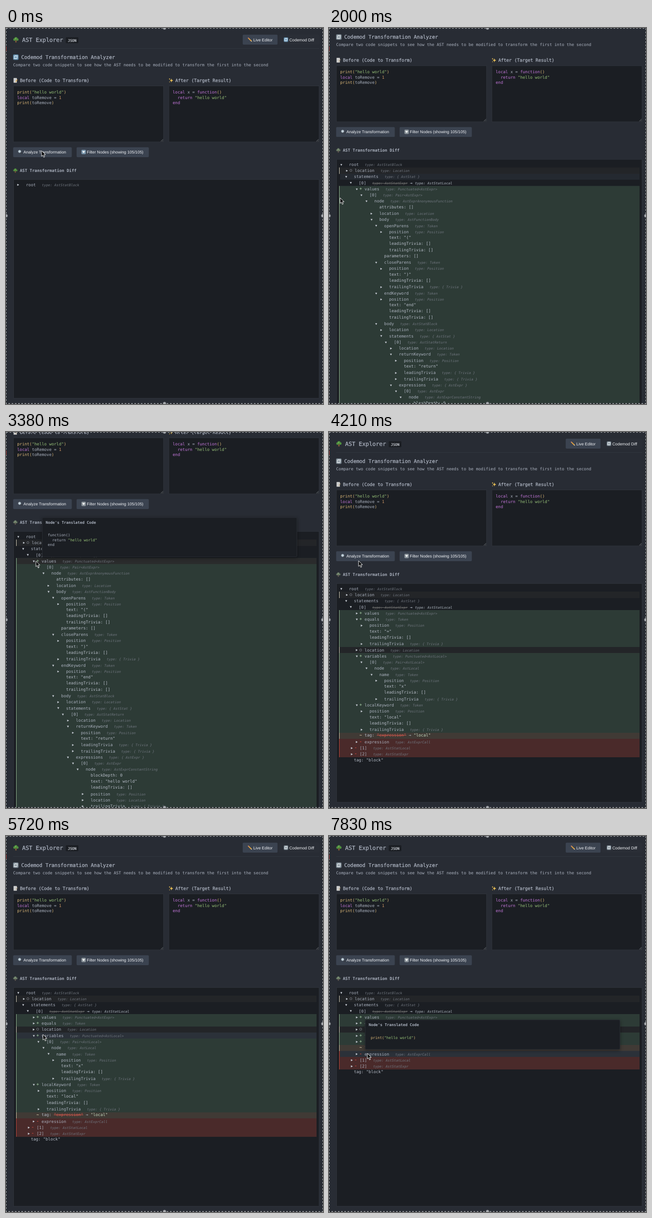
Animation of 687x815 px, one loop 8000 ms. Source, as an HTML page:

```html
<!DOCTYPE html>
<html lang="en">
<head>
<meta charset="utf-8">
<title>AST Explorer</title>
<style>
  html, body { margin: 0; width: 100%; height: 100%; overflow: hidden; background: #282c34; }
  body { position: relative; --row: 13.286px; text-rendering: geometricPrecision; }
  svg { position: absolute; left: 0; top: 0; overflow: visible; }
  svg text, #panel { font: 8.83px "DejaVu Sans Mono", monospace; fill: #abb2bf; color: #abb2bf; white-space: pre; }
  #page, #cursor, #arrow, #hand, #bar, .tip, .fold, .dull { animation: 8s step-end infinite; }

  svg .h1 { font-size: 12.25px; }
  svg .h2 { font-size: 10.9px; }
  svg .h3 { font-size: 9.6px; }
  svg .h4 { font-size: 8.9px; }
  svg .h1, svg .h2, svg .h3 { stroke: #abb2bf; stroke-width: .3px; }
  svg .h4 { font-weight: bold; }
  svg .badge { font-size: 7.75px; fill: #d5d9e0; stroke: #d5d9e0; stroke-width: .2px; }
  svg .btn { font: 8.82px "Liberation Sans", Arial, sans-serif; fill: #f2f4f7; }
  .dull { animation-name: dull; }
  .call { fill: #dcb878; color: #dcb878; }
  .str { fill: #98c379; color: #98c379; }
  .key { fill: #c678dd; }
  .num { fill: #d19a66; }
  .box { fill: #1b1e23; stroke: #30353d; }
  .face { fill: #3b4350; }

  #panel { position: absolute; left: 15.5px; top: 327.5px; width: 663.5px; min-height: 475px;
    box-sizing: border-box; padding: 4.5px 5px 5px 5.5px; border: 1px solid #2e333b; background: #1b1e23; isolation: isolate; }
  .row { position: relative; box-sizing: border-box; height: var(--row); line-height: var(--row);
    padding: .7px 0 0 calc(21.3px + 10.63px * var(--d) + var(--shift, 0px)); }
  .mark { position: absolute; margin-left: -11.2px; color: var(--edge); }
  .tri { position: absolute; margin-left: -19.4px; top: 4.6px; width: 4.6px; height: 4.6px; background: #c3c8d0;
    clip-path: polygon(10% 0, 100% 50%, 10% 100%); }
  .open { transform: rotate(90deg); }
  .leaf { color: #b6bcc7; }
  .type { font-size: 7.475px; font-style: italic; color: #70767f; }
  .row .type:first-of-type { margin-left: 13.3px; }
  .type.new { font-weight: bold; color: #828991; }
  .was { color: #d0574c; text-decoration: line-through; }
  .type.was { color: #70706f; }
  .now { color: #c5dcc0; }
  .add, .del, .loc, .mod { --shift: 1.9px; position: relative; }
  :is(.add, .del, .loc, .mod)::before { content: ""; position: absolute; z-index: -2; inset: 0;
    background: var(--bg); border-left: 1.8px solid var(--edge); }
  .add { --bg: #2d3b36; --edge: #94b894; }
  .del { --bg: #4a2a2a; --edge: #c2483d; }
  .loc { --bg: #232528; --edge: #d9d2bd; }
  .mod { --bg: #403a35; --edge: #dccbaa; }
  .loc .mark { color: #8b9098; }
  .fold > .row > .tri { transform: rotate(var(--turn)); }
  .fold > .kids { max-height: var(--max); overflow: hidden; }

  #bar { position: absolute; z-index: -1; left: 7.3px; right: 5px; top: 4.5px; height: var(--row); background: #2b3139; animation-name: hover; }
  .tip { position: absolute; z-index: 2; left: 61px; width: 551px; border: 1px solid #292d33; border-radius: 3px;
    background: #1b1e23; box-shadow: 0 2px 7px #0006; font-size: 8.1px; line-height: 10.6px; }
  .tip b { display: block; margin: 5px 0 17px 7.5px; font-size: 8.23px; }
  .tip div { margin: 0 0 20px 12px; }
  #tip1 { top: -31px; animation-name: tip1; }
  #tip2 { top: 69.5px; animation-name: tip2; }

  #page { position: absolute; inset: 0; animation-name: scroll; animation-timing-function: linear; }
  #cursor { position: absolute; left: 0; top: 0; animation-name: move; animation-timing-function: ease-in-out; }
  #arrow { animation-name: arrow; }
  #hand { animation-name: hand; }

  @keyframes scroll {
    0%, 22.5% { transform: none; }
    25% { transform: translateY(-43.4px); animation-timing-function: ease-out; }
    29.4%, 49.99% { transform: translateY(-112.9px); }
    50%, 100% { transform: none; }
  }
  @keyframes move {
    0%, 2.5% { transform: translate(77px, 266px); }
    8%, 21% { transform: translate(80px, 268px); }
    25% { transform: translate(24px, 368px); }
    31.5% { transform: translate(58px, 242px); }
    34.9%, 37.9% { transform: translate(88px, 278px); }
    44%, 47.9% { transform: translate(60px, 280px); }
    50%, 52.6% { transform: translate(64px, 279px); }
    59.9%, 64.25% { transform: translate(60px, 405px); }
    71.5%, 77.6% { transform: translate(80px, 430px); }
    80.2%, 81.5% { transform: translate(60px, 432px); }
    87.5%, 89.4% { transform: translate(60px, 445px); }
    97.4%, 100% { transform: translate(83px, 471px); }
  }
  @keyframes arrow { 0% { opacity: 1; } 3.5% { opacity: 0; } 22% { opacity: 1; } 100% { opacity: 1; } }
  @keyframes hand { 0% { opacity: 0; } 3.5% { opacity: 1; } 22% { opacity: 0; } 100% { opacity: 0; } }
  @keyframes dull { 0% { filter: none; } 22.5%, 100% { filter: saturate(.3); } }
  @keyframes hover {
    0% { opacity: 0; transform: none; }
    14.625% { opacity: 1; transform: translateY(var(--row)); }
    24% { opacity: .6; transform: translateY(calc(2 * var(--row))); }
    26% { opacity: 0; transform: none; }
    30.5% { opacity: 1; transform: translateY(var(--row)); background: #2a2b2c; }
    32.6% { opacity: 1; transform: translateY(calc(2 * var(--row))); }
    33.8% { opacity: 1; transform: translateY(calc(4 * var(--row))); }
    50% { opacity: 0; transform: none; }
    58.5% { opacity: 1; transform: translateY(calc(5 * var(--row))); }
    67% { opacity: 1; transform: translateY(calc(6 * var(--row))); }
    69.3% { opacity: 1; transform: translateY(calc(7 * var(--row))); background: #2b3139; }
    84.8% { opacity: 1; transform: translateY(calc(8 * var(--row))); }
    93% { opacity: 1; transform: translateY(calc(9 * var(--row))); }
    95.2%, 100% { opacity: 1; transform: translateY(calc(10 * var(--row))); }
  }
  @keyframes tip1 { 0% { opacity: 0; } 39% { opacity: 1; } 50% { opacity: 0; } 100% { opacity: 0; } }
  @keyframes tip2 { 0% { opacity: 0; } 96.8% { opacity: 1; } 100% { opacity: 1; } }
  @keyframes fold0 { 0% { --max: 0; --turn: 0deg; } 14.625%, 100% { --max: 9999px; --turn: 90deg; } }
  @keyframes fold1 { 0% { --max: 9999px; --turn: 90deg; } 50%, 100% { --max: 0; --turn: 0deg; } }
  @keyframes fold2 { 0% { --max: 9999px; --turn: 90deg; } 64.25%, 100% { --max: 0; --turn: 0deg; } }
  @keyframes fold3 { 0% { --max: 9999px; --turn: 90deg; } 81%, 100% { --max: 0; --turn: 0deg; } }
  @keyframes fold4 { 0% { --max: 9999px; --turn: 90deg; } 89.375%, 100% { --max: 0; --turn: 0deg; } }
</style>
</head>
<body>
<div id="page">
  <svg width="687" height="815">
    <defs>
      <symbol id="tree" viewBox="0 0 10 10"><path d="M4.2 5h1.6l.4 5H3.8z" fill="#8a6138"/><g fill="#4f8f3f"><circle cx="5" cy="2.6" r="2.5"/><circle cx="2.5" cy="4.6" r="2.3"/><circle cx="7.5" cy="4.6" r="2.3"/></g><circle cx="4.4" cy="3" r="1.3" fill="#72ae55"/></symbol>
      <symbol id="sync" viewBox="0 0 10 10"><rect width="10" height="10" rx="1.8" fill="#6b9abb"/><path d="M2.2 5a2.8 2.8 0 0 1 4.7-2M7.8 5a2.8 2.8 0 0 1-4.7 2" fill="none" stroke="#fff" stroke-width="1.1"/><path d="M6 4h2.4V1.6zM4 6H1.6v2.4z" fill="#fff"/></symbol>
      <symbol id="memo" viewBox="0 0 10 10"><path d="M1 0h7v10H1z" fill="#e4e5e3"/><path d="M2.2 2h4.6M2.2 4h4M2.2 6h3M2.2 8h2" stroke="#8b929b" stroke-width=".7"/><path d="M9.2 3.2L5 8.4" stroke="#dda13c" stroke-width="1.5"/></symbol>
      <symbol id="spark" viewBox="0 0 10 10"><path d="M6 1l1.1 3L10 5.2 7.1 6.4 6 9.5 4.9 6.4 2 5.2 4.9 4zM2 0l.6 1.5L4 2l-1.4.6L2 4l-.6-1.4L0 2l1.4-.5zM2 7l.4 1 1 .4-1 .4-.4 1-.4-1-1-.4 1-.4z" fill="#e6bd55"/></symbol>
      <symbol id="lens" viewBox="0 0 10 10"><path d="M5.6 5.6L9.3 9.3" stroke="#34383e" stroke-width="1.7"/><circle cx="3.7" cy="3.7" r="3" fill="#c4d3dc" stroke="#8f9aa3"/></symbol>
      <symbol id="down" viewBox="0 0 10 10"><rect width="10" height="10" rx="1.8" fill="#7b98ae"/><path d="M1.8 2.8h6.4L5 8z" fill="#fff"/></symbol>
      <symbol id="pencil" viewBox="0 0 10 10"><path d="M1.8 1.8l6 6" stroke="#e2a13c" stroke-width="2.3"/><path d="M.5.5l1.2 1.2" stroke="#d7837f" stroke-width="2.3"/><path d="M9.8 9.8L6.8 8.7l1.9-1.9z" fill="#ead7b0"/></symbol>
      <g id="grip"><path d="M-6.5-1.5l5-5M-3.5-1.5l2-2" stroke="#8d9299" stroke-width=".8"/></g>
    </defs>
    <use href="#tree" x="15.5" y="19.5" width="12" height="12"/>
    <text class="h1" x="35" y="29.5">AST Explorer</text>
    <rect x="129.5" y="20" width="27.5" height="13" rx="2" fill="#1b1e23"/>
    <text class="badge" x="134" y="29.5">JSON</text>
    <rect class="face" x="513" y="14.5" width="75.5" height="21.5" rx="2"/>
    <use href="#pencil" x="524" y="20.5" width="9.5" height="9.5"/>
    <text class="btn" x="536" y="28.5">Live Editor</text>
    <rect x="591" y="14.5" width="88" height="21.5" rx="2" fill="#2a2e36"/>
    <use class="dull" href="#sync" x="602" y="20.5" width="9.5" height="9.5"/>
    <text class="btn" x="614" y="28.5">Codemod Diff</text>
    <path d="M15.5 44.5H679" stroke="#31363f"/>

    <use class="dull" href="#sync" x="15.5" y="57.5" width="11.5" height="11.5"/>
    <text class="h2" x="33" y="67">Codemod Transformation Analyzer</text>
    <text x="15.5" y="82.5">Compare two code snippets to see how the AST needs to be modified to transform the first into the second</text>
    <use class="dull" href="#memo" x="15.5" y="108.5" width="10" height="10"/>
    <text class="h3" x="30.3" y="117">Before (Code to Transform)</text>
    <use href="#spark" x="352.5" y="108.5" width="10" height="10"/>
    <text class="h3" x="367" y="117">After (Target Result)</text>

    <rect class="box" x="16" y="125.5" width="325.5" height="121.5"/>
    <rect class="box" x="353" y="125.5" width="325.5" height="121.5"/>
    <use href="#grip" x="342" y="247.5"/>
    <use href="#grip" x="679" y="247.5"/>
    <text x="24.3" y="142"><tspan class="call">print(</tspan><tspan class="str">"hello world"</tspan><tspan class="call">)</tspan></text>
    <text x="24.3" y="153.5"><tspan class="key">local</tspan> toRemove = <tspan class="num">1</tspan></text>
    <text x="24.3" y="165"><tspan class="call">print(</tspan>toRemove<tspan class="call">)</tspan></text>
    <text x="361.3" y="142"><tspan class="key">local</tspan> x = <tspan class="key">function</tspan><tspan class="call">()</tspan></text>
    <text x="361.3" y="153.5">  <tspan class="key">return</tspan> <tspan class="str">"hello world"</tspan></text>
    <text x="361.3" y="165"><tspan class="key">end</tspan></text>

    <rect class="face" x="15.5" y="258.5" width="127" height="21.5" rx="2"/>
    <use href="#lens" x="26" y="264" width="9.5" height="9.5"/>
    <text class="btn" x="37.7" y="272">Analyze Transformation</text>
    <rect class="face" x="153" y="258.5" width="156.5" height="21.5" rx="2"/>
    <use class="dull" href="#down" x="163.5" y="264" width="9.5" height="9.5"/>
    <text class="btn" x="175.3" y="272">Filter Nodes (showing 105/105)</text>
    <use class="dull" href="#tree" x="15.5" y="304" width="9.5" height="10"/>
    <text class="h4" x="30" y="312">AST Transformation Diff</text>
  </svg>
  <div id="panel"><div id="bar"></div><div id="tree-root"></div><div class="tip" id="tip1"><b>Node's Translated Code</b><div>function()
  return <span class="str">"hello world"</span>
end</div></div><div class="tip" id="tip2"><b>Node's Translated Code</b><div><span class="call">print(</span><span class="str">"hello world"</span><span class="call">)</span></div></div></div>
</div>

<svg width="687" height="815">
  <rect x=".5" y=".5" width="686" height="813.5" fill="none" stroke="#17191d" stroke-width="1.5"/>
  <rect x=".5" y=".5" width="686" height="813.5" fill="none" stroke="#a3a6aa" stroke-width="1.3" stroke-dasharray="4 3"/>
  <path d="M.5 40v10" stroke="#b5403a"/>
  <g fill="#a9acb0" stroke="#5f6369"><circle cx="343.5" r="3.5"/><circle cx="343.5" cy="814" r="3.5"/><circle cy="407" r="3.5"/><circle cx="686.5" cy="407" r="3.5"/></g>
</svg>
<svg id="cursor" width="12" height="18">
  <path id="arrow" d="M0 0v12.2l2.8-2.6 2 4.6 2.1-.9-2-4.5h3.9z" fill="#08090a" stroke="#f4f4f4"/>
  <path id="hand" d="M-1.5 1.2a1.1 1.1 0 0 1 2.2 0V5l4 .9q1 .4.9 1.6l-.7 4.5-.8 2H-.6L-3.8 9.6q-.9-1.5.6-1.6l1.7 1.3z" fill="#f4f4f4" stroke="#111" stroke-width=".9"/>
</svg>

<script>
// Indent = depth; then v open, > closed, . leaf or the number of a timed fold; then a status mark.
const outline = `
0 root  AstStatBlock
 >○ location  Location
 v statements  { AstStat }
  v [0]  AstStatExpr → AstStatLocal
   1+ values  Punctuated<AstExpr>
    v [0]  Pair<AstExpr>
     v node  AstExprAnonymousFunction
      . attributes: []
      > location  Location
      v body  AstFunctionBody
       v openParens  Token
        > position  Position
        . text: "("
        . leadingTrivia: []
        . trailingTrivia: []
       . parameters: []
       v closeParens  Token
        > position  Position
        . text: ")"
        . leadingTrivia: []
        > trailingTrivia  { Trivia }
       v endKeyword  Token
        > position  Position
        . text: "end"
        . leadingTrivia: []
        . trailingTrivia: []
       v body  AstStatBlock
        > location  Location
        v statements  { AstStat }
         v [0]  AstStatReturn
          > location  Location
          v returnKeyword  Token
           > position  Position
           . text: "return"
           > leadingTrivia  { Trivia }
           > trailingTrivia  { Trivia }
          v expressions  { AstExpr }
           v [0]  AstExpr
            v node  AstExprConstantString
             . blockDepth: 0
             . text: "hello world"
             . leadingTrivia: []
             > position  Position
             > location  Location
             > trailingTrivia  { Trivia }
   2+ equals  Token
    > position  Position
    . text: "="
    . leadingTrivia: []
    > trailingTrivia  { Trivia }
   >○ location  Location
   3+ variables  Punctuated<AstLocal>
    v [0]  Pair<AstLocal>
     v node  AstLocal
      v name  Token
       > position  Position
       . text: "x"
       . leadingTrivia: []
       > trailingTrivia  { Trivia }
   4+ localKeyword  Token
    > position  Position
    . text: "local"
    . leadingTrivia: []
    > trailingTrivia  { Trivia }
   .~ tag: "expression" → "local"
   >- expression  AstExprCall
  >- [1]  AstStatLocal
  >- [2]  AstStatExpr
 . tag: "block"`;

const status = { "+": "add", "-": "del", "~": "mod", "○": "loc" };

function add(parent, tag, cls, text = "") {
  const el = document.createElement(tag);
  el.className = cls;
  el.textContent = text;
  return parent.appendChild(el);
}

const parents = [document.getElementById("tree-root")];
for (const line of outline.trim().split("\n")) {
  const [, indent, kind, mark, name, type] = line.match(/^( *)(\S)(\S?) (.+?)(?:  (.+))?$/);
  const depth = indent.length;
  const node = add(parents[depth], "div", status[mark] || "");
  const row = add(node, "div", kind === "." ? "row leaf" : "row");
  row.style.setProperty("--d", depth);
  if (kind !== ".") add(row, "i", kind === "v" ? "tri open" : "tri");
  if (mark) add(row, "b", "mark", mark);

  const [label, after] = name.split(" → ");
  if (after) {
    const [key, old] = label.split(" ");
    row.append(key + " ");
    add(row, "span", "was", old);
    row.append(" → ");
    add(row, "span", "now", after);
  } else row.append(label);

  if (type) {
    const [before, next] = type.split(" → ");
    add(row, "span", next ? "type was" : "type", "type: " + before);
    if (next) {
      add(row, "b", "", " → ");
      add(row, "span", "type new", "type: " + next);
    }
  }
  if (/\d/.test(kind)) {
    node.classList.add("fold");
    node.style.animationName = "fold" + kind;
  }
  parents[depth + 1] = add(node, "div", "kids");
}
</script>
</body>
</html>
```
